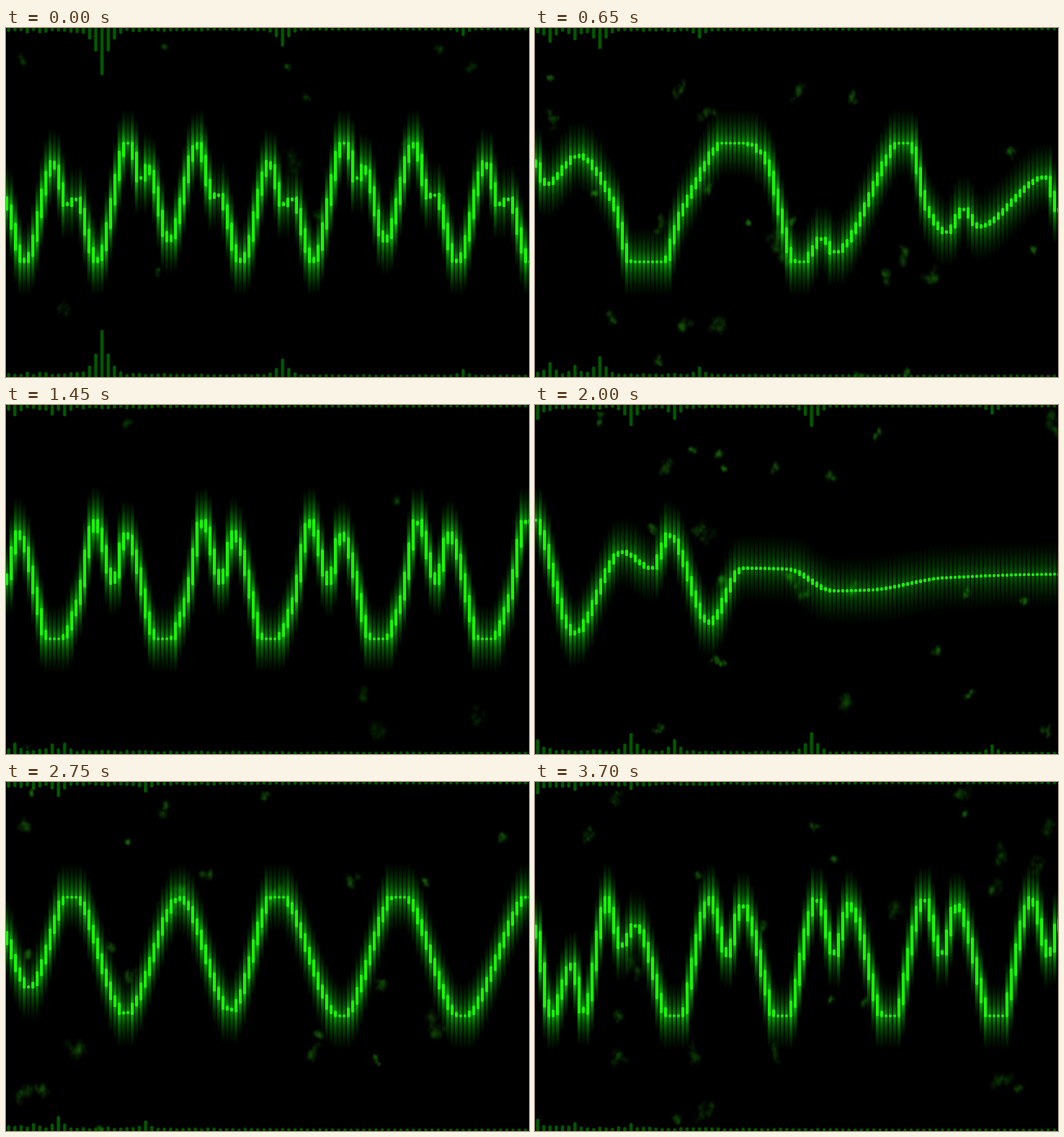
An HTML page with a canvas that plays this animation: 600x400 px, repeating every 3.75 s.

```html
<!DOCTYPE html>
<html lang="en">
<head>
<meta charset="utf-8">
<title>Oscilloscope</title>
<style>
  html, body { margin: 0; width: 100%; height: 100%; overflow: hidden; background: #000; }
  canvas { display: block; width: 600px; height: 400px; }
</style>
</head>
<body>
<canvas id="stage" width="600" height="400"></canvas>
<script>
const ctx = document.getElementById('stage').getContext('2d');
const W = 600, H = 400, MID = 200, CEILING = 132, FLOOR = 268;
const STEP = 50, STEPS = 75;
const BARS = 121, BAR_PITCH = W / BARS;
const BANDS = 84, BAND_PITCH = W / BANDS;
const SCROLL = 37;

// One cycle of x,y turning points, repeated across the stage
function repeat(cycle, start, period) {
  const out = [];
  for (let x = start; x < W + period; x += period)
    for (let i = 0; i < cycle.length; i += 2) out.push(x + cycle[i], cycle[i + 1]);
  return out;
}

// keys: turning points of the wave, clipped at CEILING and FLOOR
// tones: spectrum peaks as [band, height]
const poses = [
  { at: 0, clouds: 11, haze: 0.6,
    keys: repeat([0, 272, 33, 153, 48, 205, 59, 194, 82, 270, 120, 122, 132, 178, 141, 158,
      165, 245, 199, 130, 215, 195, 222, 189], 22 - 248, 248),
    tones: [[15, 54], [44, 21], [73, 9]] },
  { at: 13, clouds: 24, haze: 1,
    keys: [0, 152, 12, 180, 50, 146, 90, 200, 115, 285, 140, 285, 170, 207, 225, 124, 262, 145,
      303, 278, 330, 240, 343, 258, 428, 122, 450, 207, 473, 235, 492, 206, 508, 228, 587, 170, 600, 210],
    tones: [[2, 17], [6, 14], [10, 24], [26, 12]] },
  { at: 29, clouds: 6, haze: 0.6,
    keys: repeat([0, 284, 30, 222, 48, 130, 70, 205, 83, 146], 54 - 123.5, 123.5),
    tones: [[1, 13], [7, 12], [9, 13]] },
  { at: 40, clouds: 24, haze: 1,
    keys: [-5, 120, 45, 262, 100, 168, 135, 188, 154, 148, 200, 250, 238, 187, 290, 188,
      342, 213, 385, 212, 470, 198, 600, 194],
    tones: [[0, 17], [15, 24], [22, 17], [44, 25], [73, 11]] },
  { at: 55, clouds: 26, haze: 1,
    keys: [-20, 132, 27, 236, 75, 122, 137, 266, 200, 132, 258, 262, 310, 122, 385, 272,
      451, 122, 523, 272, 608, 120],
    tones: [[4, 9], [8, 17], [22, 12]] },
  { at: 63, clouds: 3, haze: 0.35,
    keys: repeat([0, 126, 20, 148, 38, 163, 60, 243, 95, 226, 113, 253, 135, 195], 45 - 157, 157),
    tones: [[3, 10], [5, 8]] },
  { at: 74, clouds: 24, haze: 0.8,
    keys: [0, 165, 18, 270, 43, 208, 56, 268, 83, 133, 99, 190, 115, 163].concat(
      repeat([9, 290, 49, 133, 69, 200, 85, 140], 152, 123)),
    tones: [[0, 14], [6, 10], [15, 9]] }
];

const lerp = (a, b, u) => a + (b - a) * u;
const clamp = (v, lo = 0, hi = 1) => Math.max(lo, Math.min(hi, v));
const smooth = u => u * u * (3 - 2 * u);

function random(seed) {
  return () => {
    seed = (seed * 1664525 + 1013904223) >>> 0;
    return seed / 4294967296;
  };
}

// Monotone cubic through the turning points, with a little grain away from the middle
function curve(p) {
  const n = p.length / 2;
  const slope = i => (p[2 * i + 3] - p[2 * i + 1]) / (p[2 * i + 2] - p[2 * i]);
  const tangent = i => {
    if (i <= 0 || i >= n - 1) return 0;
    const a = slope(i - 1), b = slope(i);
    return a * b <= 0 ? 0 : 2 * a * b / (a + b);
  };
  return x => {
    let i = 0;
    while (i < n - 2 && p[2 * i + 2] < x) i++;
    const x0 = p[2 * i], y0 = p[2 * i + 1], h = p[2 * i + 2] - x0, y1 = p[2 * i + 3];
    const u = clamp((x - x0) / h), v = 1 - u;
    const y = y0 * v * v * (1 + 2 * u) + y1 * u * u * (1 + 2 * v)
      + h * u * v * (v * tangent(i) - u * tangent(i + 1));
    return clamp(y + Math.sin(x * 0.63) * (y - MID) / 40, CEILING, FLOOR);
  };
}

// Each tone fades into its neighbours above a low, falling floor
function spectrum(tones, rnd) {
  return Array.from({ length: BANDS }, (_, i) => Math.max(
    2.5 + (1 + 4 * rnd()) * Math.exp(-i / 28),
    ...tones.map(([band, height]) => height * Math.exp(-0.7 * Math.abs(i - band)))));
}

// A cloud is a random walk of puffs, which leaves a ragged wisp
function makeClouds(count, rnd) {
  const puffs = [];
  for (let c = 0; c < count; c++) {
    const cx = rnd() * W, cy = rnd() * H, size = 4 + 9 * rnd() * rnd();
    let x = cx, y = cy;
    for (let k = 0; k < 26; k++) {
      x = lerp(x, cx, 0.12) + (rnd() - 0.5) * size;
      y = lerp(y, cy, 0.08) + (rnd() - 0.5) * size * 1.2;
      puffs.push({ x, y, r: 2 + rnd() * size * 0.4 });
    }
  }
  return puffs;
}

const puffSprite = document.createElement('canvas');
puffSprite.width = puffSprite.height = 32;
{
  const c = puffSprite.getContext('2d');
  const g = c.createRadialGradient(16, 16, 0, 16, 16, 16);
  g.addColorStop(0, 'rgb(42,125,28)');
  g.addColorStop(0.5, 'rgba(42,125,28,.6)');
  g.addColorStop(1, 'rgba(42,125,28,0)');
  c.fillStyle = g;
  c.fillRect(0, 0, 32, 32);
}

poses.forEach((pose, i) => {
  const rnd = random(31 + i * 977);
  pose.y = curve(pose.keys);
  pose.levels = spectrum(pose.tones, rnd);
  pose.puffs = makeClouds(pose.clouds, rnd);
});

function drawClouds(pose, alpha, drift) {
  if (alpha <= 0) return;
  ctx.globalAlpha = 0.14 * alpha * pose.haze;
  for (const { x, y, r } of pose.puffs)
    ctx.drawImage(puffSprite, x - r, y - r - drift, r * 2, r * 2.4);
  ctx.globalAlpha = 1;
}

function drawBands(a, b, u) {
  for (let i = 0; i < BANDS; i++) {
    const h = lerp(a.levels[i], b.levels[i], u), x = 3 + i * BAND_PITCH;
    for (const [width, alpha] of [[4.4, 0.4], [3, 0.65]]) {
      ctx.fillStyle = `rgba(0,115,0,${alpha})`;
      ctx.beginPath();
      ctx.roundRect(x - width / 2, -3, width, h + 3, 1.5);
      ctx.roundRect(x - width / 2, H - h, width, h + 3, 1.5);
      ctx.fill();
    }
  }
}

function drawWaveBar(x, y0, y1) {
  const top = Math.min(y0, y1) - 1.6, bottom = Math.max(y0, y1) + 1.6;
  const reach = 37, span = bottom - top + 2 * reach, edge = reach / span;
  const swing = Math.abs((top + bottom) / 2 - MID) / (FLOOR - MID);
  const strength = Math.min(0.85, 0.3 + 0.25 * swing + (bottom - top) * 0.018);
  const glow = ctx.createLinearGradient(0, top - reach, 0, bottom + reach);
  const stops = [[0, 0], [0.35, 0.18], [0.7, 0.5], [1, 1]];
  for (const [pos, k] of stops) {
    const tint = `rgba(0,200,0,${strength * k})`;
    glow.addColorStop(edge * pos, tint);
    glow.addColorStop(1 - edge * pos, tint);
  }
  ctx.fillStyle = glow;
  ctx.fillRect(x - 1.7, top - reach, 3.4, span);
  ctx.globalAlpha = 0.3;
  ctx.fillRect(x - BAR_PITCH / 2, top - reach, BAR_PITCH, span);
  ctx.globalAlpha = 1;
  ctx.fillStyle = '#14ff00';
  ctx.beginPath();
  ctx.roundRect(x - 1.7, top, 3.4, bottom - top, 1.5);
  ctx.fill();
}

// Folds any x back onto the stage
function mirror(x) {
  const m = ((x % (2 * W)) + 2 * W) % (2 * W);
  return m > W ? 2 * W - m : m;
}

function draw(step) {
  let i = poses.length - 1;
  while (poses[i].at > step) i--;
  const a = poses[i], b = poses[(i + 1) % poses.length];
  const gap = (b.at || STEPS) - a.at, since = step - a.at, left = gap - since;
  const u = since / gap, mix = smooth(clamp((u - 0.3) / 0.4));
  const y = x => lerp(a.y(mirror(x + since * SCROLL)), b.y(mirror(x - left * SCROLL)), mix);

  ctx.fillStyle = '#000';
  ctx.fillRect(0, 0, W, H);
  drawClouds(a, 1 - u, since * 1.5);
  drawClouds(b, u, -left * 1.5);
  drawBands(a, b, u);
  for (let k = 0; k <= BARS; k++) {
    const x = 1 + k * BAR_PITCH, half = BAR_PITCH * 0.6;
    drawWaveBar(x, y(Math.max(0, x - half)), y(Math.min(W, x + half)));
  }
}

let shown = -1;
function tick() {
  const step = Math.floor(performance.now() / STEP) % STEPS;
  if (step !== shown) draw(shown = step);
  requestAnimationFrame(tick);
}
tick();
</script>
</body>
</html>
```
